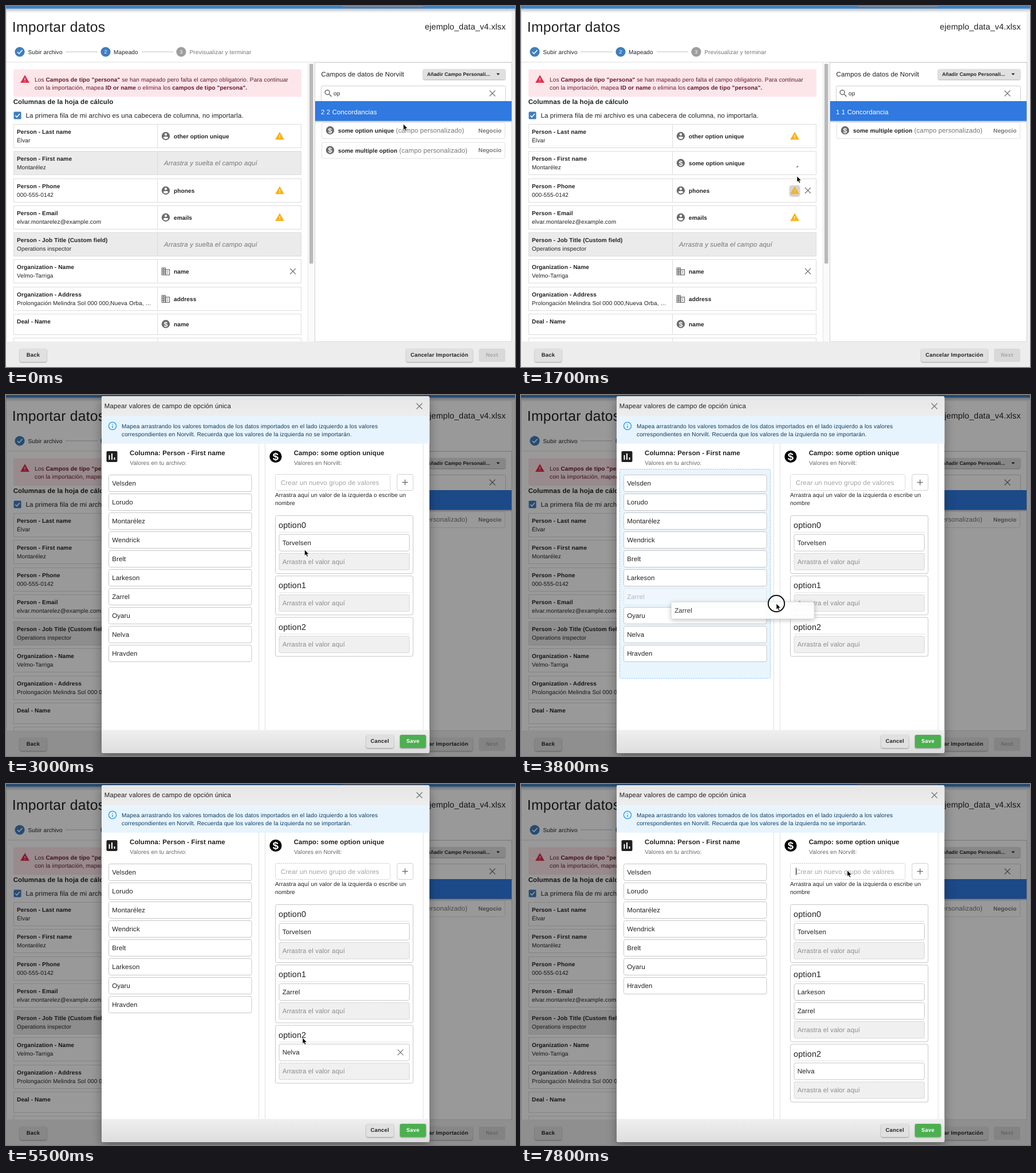
Animation, 889 px wide and 630 px high, one loop 8 s. Source, as an HTML page:

```html
<!DOCTYPE html>
<html lang="es">
<head>
<meta charset="utf-8">
<title>Importar datos</title>
<style>
  html, body { margin: 0; width: 100%; height: 100%; overflow: hidden; background: #fff; }
  svg { display: block; width: 889px; height: 630px; }
  text { font-family: "Liberation Sans", Arial, sans-serif; letter-spacing: .01em; white-space: pre; text-rendering: geometricPrecision; }
  .b { font-weight: 700; }
  .i { font-style: italic; }
  .btn { font-weight: 700; letter-spacing: .0286em; }
  .raised { filter: drop-shadow(0 1px 1.2px rgba(0,0,0,.35)); }
  .ghost { filter: drop-shadow(0 2px 4px rgba(0,0,0,.28)); }
  .dialog { filter: drop-shadow(0 6px 9px rgba(0,0,0,.35)); }
</style>
</head>
<body>
<svg id="stage" viewBox="0 0 889 630" xmlns="http://www.w3.org/2000/svg"></svg>
<script>
const LOOP = 8000, STEP = 100;
const INK = '#212121', GREY = '#757575', BLUE = '#3f7fbf';
const PRODUCT = 'Norvilt';

// ---------- drawing helpers ----------
const text = (x, y, s, size = 10.1, fill = INK, cls = '', extra = '') =>
  `<text x="${x}" y="${y}" font-size="${size}" fill="${fill}" class="${cls}" ${extra}>${s}</text>`;
const bold = (x, y, s, size, fill) => text(x, y, s, size, fill, 'b');
const rect = (x, y, w, h, fill, extra = '') =>
  `<rect x="${x}" y="${y}" width="${w}" height="${h}" fill="${fill}" ${extra}/>`;
const box = (x, y, w, h, stroke, fill = '#fff', r = 0, extra = '') =>
  rect(x + .5, y + .5, w - 1, h - 1, fill, `stroke="${stroke}" rx="${r}" ${extra}`);
const line = (x1, y1, x2, y2, stroke = '#e0e0e0', w = 1) =>
  `<path d="M${x1} ${y1}L${x2} ${y2}" stroke="${stroke}" stroke-width="${w}" fill="none"/>`;
const circle = (x, y, r, fill, extra = '') => `<circle cx="${x}" cy="${y}" r="${r}" fill="${fill}" ${extra}/>`;
const group = (body, extra) => `<g ${extra}>${body}</g>`;
const icon = (x, y, d, fill, scale = .72) =>
  `<path transform="translate(${x} ${y}) scale(${scale}) translate(-12 -12)" d="${d}" fill="${fill}" fill-rule="evenodd"/>`;
const button = (x, y, w, h, label, fill = '#e0e0e0', color = INK, cls = 'raised') =>
  rect(x, y, w, h, fill, `rx="3" class="${cls}"`) +
  text(x + w / 2, y + h / 2 + 2.8, label, 9.38, color, 'btn', 'text-anchor="middle"');
const cross = (x, y, r = 5, color = GREY) =>
  line(x - r, y - r, x + r, y + r, color, 1.3) + line(x - r, y + r, x + r, y - r, color, 1.3);
const tick = (x, y, s = 1) =>
  `<path d="M${x - 4.2 * s} ${y + .2}l${3 * s} ${3 * s} ${5.6 * s} ${-6.2 * s}" fill="none" stroke="#fff" stroke-width="1.6"/>`;

const warning = (x, y, fill = '#f9b115') =>
  icon(x, y, 'M1 21h22L12 2zM13 18h-2v-2h2zM13 14h-2v-4h2z', fill);
const dollar = (x, y, r = 7.2, fill = '#6b6b6b') =>
  circle(x, y, r, fill) +
  text(x, y + r * .63, '$', r * 1.75, '#fff', 'b', 'text-anchor="middle"');
const person = (x, y) =>
  circle(x, y, 7.2, '#6b6b6b') + circle(x, y - 2.9, 2.2, '#fff') +
  `<path d="M${x - 4.3} ${y + 2.9}c0-3 8.6-3 8.6 0q-4.3 4.6-8.6 0z" fill="#fff"/>`;
function building(x, y) {
  let s = rect(x - 6.7, y - 5.9, 6.2, 12.2, 'none', 'stroke="#6b6b6b" stroke-width="1.2"') +
          rect(x, y - 3, 6.6, 9.3, 'none', 'stroke="#6b6b6b" stroke-width="1.2"') +
          line(x - 3.6, y - 6, x - 3.6, y + 6, '#6b6b6b', 1.3);
  for (let k = 0; k < 3; k++) s += line(x - 6.7, y - 3 + k * 3, x, y - 3 + k * 3, '#6b6b6b', 1.3);
  return s + rect(x + 2.6, y - .8, 1.6, 1.6, '#6b6b6b') + rect(x + 2.6, y + 2.3, 1.6, 1.6, '#6b6b6b');
}

// ---------- content ----------
const rows = [
  ['Person - Last name', 'Élvar', person, 'other option unique', true],
  ['Person - First name', 'Montarélez'],
  ['Person - Phone', '000-555-0142', person, 'phones', true],
  ['Person - Email', 'elvar.montarelez@example.com', person, 'emails', true],
  ['Person - Job Title (Custom field)', 'Operations inspector'],
  ['Organization - Name', 'Velmo-Tarriga', building, 'name'],
  ['Organization - Address', 'Prolongación Melindra Sol 000 000,Nueva Orba, …', building, 'address'],
  ['Deal - Name', '', dollar, 'name'],
];
const values = ['Velsden', 'Lorudo', 'Montarélez', 'Torvelsen', 'Wendrick', 'Brelt',
  'Larkeson', 'Zarrel', 'Oyaru', 'Nelva', 'Hravden'];

// ---------- timeline ----------
const fieldDrag = { grab: 200, drop: 1200 };
const drags = [
  { name: 'Torvelsen', option: 0, grab: 2200, drop: 2800 },
  { name: 'Zarrel', option: 1, grab: 3400, drop: 4300 },
  { name: 'Nelva', option: 2, grab: 4700, drop: 5500 },
  { name: 'Larkeson', option: 1, grab: 6000, drop: 6700 },
];
const path = [
  [0, 694, 206], [200, 690, 212], [500, 588, 172], [800, 484, 262], [1200, 481, 270],
  [1700, 482, 297], [1900, 483, 286], [2200, 345, 254], [2700, 545, 259], [2900, 540, 262],
  [3400, 363, 340], [3800, 446, 364], [4200, 540, 370], [4400, 530, 372], [4700, 352, 386],
  [5200, 520, 458], [5500, 518, 443], [6000, 336, 332], [6400, 564, 396], [6500, 571, 398],
  [6700, 570, 396], [7200, 580, 190], [7600, 570, 153], [7800, 570, 151], [LOOP, 570, 151],
];
function pointer(t) {
  const n = Math.max(1, path.findIndex(p => p[0] >= t));
  const [t0, x0, y0] = path[n - 1], [t1, x1, y1] = path[n];
  const u = (t - t0) / (t1 - t0), e = u * u * (3 - 2 * u);
  return { x: x0 + (x1 - x0) * e, y: y0 + (y1 - y0) * e };
}
const held = (d, t) => t >= d.grab && t < d.drop;

// ---------- import page ----------
function resultRow(y, name) {
  return box(551, y, 321, 29, '#e0e0e0', '#fff', 2) + dollar(566, y + 14) +
    `<text x="580" y="${y + 18}" font-size="10.1" fill="${INK}"><tspan class="b">${name}</tspan>` +
    `<tspan font-size="11.5" fill="${GREY}"> (campo personalizado)</tspan></text>` +
    bold(825, y + 17.5, 'Negocio', 10.1, GREY);
}

function mappingRow(row, i, t, p) {
  let [title, sample, symbol, field, warn] = row;
  const y = Math.round(206 + i * 47.25), h = sample ? 42 : 37, mid = y + (sample ? 21 : 18);
  const isTarget = i === 1;
  if (isTarget && t >= fieldDrag.drop) [symbol, field] = [dollar, 'some option unique'];
  const hot = isTarget && held(fieldDrag, t) && p.x < 516;
  const fill = field ? '#fff' : hot ? '#e3f2fd' : '#ebebeb';
  let s = box(13, y, 503, h, hot ? '#90caf9' : '#dcdcdc', fill) + line(264.5, y, 264.5, y + h, '#dcdcdc') +
    bold(19, y + 17.3, title) + text(19, y + 31.5, sample);
  s += field ? symbol(279, mid) + bold(293, mid + 3.7, field)
             : text(276, mid + 4, 'Arrastra y suelta el campo aquí', 11.5, GREY, 'i');
  const hover = i === 2 && t >= 1500;
  if (hover) s += rect(469.5, mid - 9, 17, 18, '#d4d4d4', 'rx="3" class="raised"');
  if (warn) s += warning(478, mid - .3);
  if (hover || i === 5) s += cross(501, mid);
  if (isTarget && t >= 1600) s += line(481.5, mid + 7.5, 484, mid + 5.3, '#555', 1.3);
  return s;
}

function page(t, p) {
  const mapped = t >= fieldDrag.drop;
  let s = rect(0, 0, 889, 630, '#fff') + rect(0, 4, 889, 8, 'url(#barShade)') +
    rect(0, 0, 889, 4.5, BLUE) + rect(588, 0, 140, 1, '#a08a80') +
    rect(883, 10, 6, 620, '#f1f1f1') + line(.5, 5, .5, 630, '#d5d5d5');
  s += text(10.8, 45, 'Importar datos', 24.7) + text(731.5, 41, 'ejemplo_data_v4.xlsx', 14.4);

  s += circle(24, 80, 8.6, BLUE) + tick(24, 80) + text(38.5, 83.7, 'Subir archivo') + line(104, 80, 160, 80, '#bdbdbd');
  s += circle(174, 80, 8.6, BLUE) + text(174, 83.1, '2', 8.66, '#fff', '', 'text-anchor="middle"') +
    text(188, 83.7, 'Mapeado') + line(237, 80, 292, 80, '#bdbdbd');
  s += circle(306, 80, 8.6, '#9e9e9e') + text(306, 83.1, '3', 8.66, '#fff', '', 'text-anchor="middle"') +
    text(320.5, 83.7, 'Previsualizar y terminar', 10.1, GREY);
  s += line(0, 98, 883, 98, '#dcdcdc');

  const wine = '#611a2e';
  s += rect(13, 110.5, 503, 48, '#fde6ea', 'rx="2"') + warning(33, 127.5, '#e0314f') +
    text(50, 131.5, 'Los <tspan class="b">Campos de tipo "persona"</tspan> se han mapeado pero falta el campo obligatorio. Para continuar', 10.1, wine) +
    text(50, 145.6, 'con la importación, mapea <tspan class="b">ID or name</tspan> o elimina los <tspan class="b">campos de tipo "persona".</tspan>', 10.1, wine);
  s += bold(12.7, 171, 'Columnas de la hoja de cálculo', 11.5) +
    rect(13.5, 184.5, 13, 13, BLUE, 'rx="1.5"') + tick(20, 191, .9) +
    text(34.5, 195, 'La primera fila de mi archivo es una cabecera de columna, no importarla.', 11.5);
  rows.forEach((row, i) => s += mappingRow(row, i, t, p));
  s += box(13, 579, 503, 40, '#dcdcdc') + line(264.5, 579, 264.5, 600, '#dcdcdc');

  s += rect(528, 99, 11, 487, '#fafafa') + line(527.5, 99, 527.5, 586, '#e4e4e4') +
    rect(530, 101, 6.5, 348.5, '#b9b9b9', 'rx="1"');
  s += box(539, 98, 345, 488, '#cfcfcf') +
    text(550.5, 122.5, `Campos de datos de ${PRODUCT}`, 11.5) +
    rect(728.5, 110, 143.5, 18, '#e0e0e0', 'rx="2.5" class="raised"') +
    bold(735.5, 122, 'Añadir Campo Personali...', 8.66) +
    `<path d="M856.500 117.500h6l-3 3.200z" fill="${INK}"/>`;
  s += box(550, 139, 323, 28, '#cfcfcf', '#fff', 2) +
    icon(563, 152.500, 'M15.500 14h-.8l-.3-.3A6.500 6.500 0 1 0 13.700 14.400l.3.3v.8l5 5 1.500-1.500zM9.500 14a4.500 4.500 0 1 1 0-9 4.500 4.500 0 0 1 0 9z', '#666') +
    text(572, 156.3, 'op') + cross(849.5, 152.5);
  s += rect(540, 200, 343, 4, 'url(#barShade)') + rect(540, 166, 343, 34.5, '#2f79e0') +
    text(550, 189, mapped ? '1 1 Concordancia' : '2 2 Concordancias', 11.5, '#fff');
  if (mapped) s += resultRow(203, 'some multiple option');
  else s += group(resultRow(203, 'some option unique'), `opacity="${held(fieldDrag, t) ? .3 : 1}"`) +
    resultRow(237.5, 'some multiple option');

  s += rect(0, 585.5, 889, 45, '#ededed') + button(24, 598, 47, 23, 'Back') +
    button(699, 598, 116, 23, 'Cancelar Importación') +
    button(826, 598, 46, 23, 'Next', '#d9d9d9', '#a6a6a6', '');
  if (held(fieldDrag, t)) {
    const g = pointer(fieldDrag.grab);
    s += group(resultRow(203, 'some option unique'),
      `class="ghost" opacity=".9" transform="translate(${p.x - g.x} ${p.y - g.y})"`);
  }
  return s;
}

// ---------- value mapping dialog ----------
const valueCard = (x, y, w, name) =>
  box(x, y, w, 30, '#c6c6c6', '#fff', 3) + text(x + 6.2, y + 18.7, name, 11.5);

function optionCard(index, y, items, active, p, idle) {
  const h = 69 + 33 * items.length;
  let s = box(470, y, 241.5, h, '#c6c6c6', '#fff', 3) + text(476, y + 22, 'option' + index, 14.4) +
    line(477, y + 29.5, 705, y + 29.5);
  items.forEach((name, k) => {
    const top = y + 32.8 + 33 * k;
    s += valueCard(476.5, top, 228.5, name);
    if (idle && p.x > 476 && p.x < 705 && p.y > top - 12 && p.y < top + 20) s += cross(689, top + 15);
  });
  const top = y + 32.8 + 33 * items.length;
  return s + box(476.5, top, 228.5, 30, active ? '#7dbdf0' : '#c0c0c0', active ? '#e3f2fd' : '#f0f0f0', 2, 'stroke-dasharray="2 1.5"') +
    text(482.7, top + 18.7, 'Arrastra el valor aquí', 11.5, active ? '#b4c4d0' : '#8c8c8c');
}

function dialog(t, p) {
  const current = drags.find(d => held(d, t));
  const done = drags.filter(d => t >= d.drop);
  const left = values.filter(v => !done.some(d => d.name === v));
  const overSlot = current && p.x > 470;
  let s = rect(167, 2, 572.5, 623, '#fff', 'rx="3" class="dialog"') +
    `<path d="M167 37V5q0-3 3-3h566.500q3 0 3 3v32z" fill="url(#headShade)"/>` +
    `<path d="M167 584.500h572.500V622q0 3-3 3H170q-3 0-3-3z" fill="url(#footShade)"/>`;
  s += text(171.8, 23, 'Mapear valores de campo de opción única', 11.5) + cross(722, 19.5);
  const navy = '#0d3c61';
  s += rect(167, 37, 572.5, 48, '#e8f4fd') +
    circle(186, 54, 6.6, 'none', 'stroke="#2196f3" stroke-width="1.3"') +
    line(186, 53.5, 186, 57.5, '#2196f3', 1.4) + line(186, 50.4, 186, 51.8, '#2196f3', 1.4) +
    text(202, 57.5, 'Mapea arrastrando los valores tomados de los datos importados en el lado izquierdo a los valores', 10.1, navy) +
    text(202, 71.7, `correspondientes en ${PRODUCT}. Recuerda que los valores de la izquierda no se importarán.`, 10.1, navy);
  s += line(441.5, 85, 441.5, 584.5) + line(452.5, 85, 452.5, 584.5) + line(728.5, 85, 728.5, 584.5);

  s += rect(175.5, 98, 19, 19, INK, 'rx="2"') + line(180.500, 105, 180.500, 113, '#fff', 2) +
    line(185, 102, 185, 113, '#fff', 2) + line(189.500, 109, 189.500, 113, '#fff', 2) +
    bold(216, 104.5, 'Columna: Person - First name', 11.5) + text(216.3, 122, 'Valores en tu archivo:', 10.1, '#666');
  s += dollar(471, 107.5, 10.6, '#000') + bold(502.7, 104.5, 'Campo: some option unique', 11.5) +
    text(503, 122, `Valores en ${PRODUCT}:`, 10.1, '#666');

  if (current && !overSlot)
    s += box(172, 129, 264, 33 * left.length + 36, '#8cc8f2', '#e9f5fd', 2, 'stroke-dasharray="2.5 1.5"');
  left.forEach((name, i) => {
    const lifted = current && current.name === name;
    s += group(valueCard(179, 139 + 33 * i, 250.5, name), lifted ? 'opacity=".28"' : '');
  });

  s += box(470, 138, 201.5, 29, '#c0c0c0', '#fff', 3, 'stroke-dasharray="2 1.5"') +
    text(480, 156.6, 'Crear un nuevo grupo de valores', 11.5, '#a3a3a3') +
    box(682.5, 138, 29, 29, '#d0d0d0', '#fff', 3) +
    line(692, 152.5, 702, 152.5, '#666', 1.3) + line(697, 147.5, 697, 157.5, '#666', 1.3) +
    text(470, 177.7, 'Arrastra aquí un valor de la izquierda o escribe un') + text(470, 191.9, 'nombre');
  if (t >= 7700) s += line(480.5, 146, 480.5, 159, '#222');

  let y = 210;
  for (let k = 0; k < 3; k++) {
    const items = done.filter(d => d.option === k).map(d => d.name).reverse();
    s += optionCard(k, y, items, overSlot && current.option === k, p, !current);
    y += 72.3 + 33 * items.length;
  }
  s += button(629, 593, 48, 23, 'Cancel') + button(688, 593, 45.5, 23, 'Save', '#4caf50', '#fff');

  if (current) {
    const g = pointer(current.grab), top = 139 + 33 * left.indexOf(current.name);
    s += group(valueCard(179 + p.x - g.x, top + p.y - g.y, 250.5, current.name)
      .replace('#c6c6c6', '#e2e2e2'), 'class="ghost" opacity=".9"');
  }
  return s;
}

// ---------- pointer and composition ----------
function cursor(p, pressed) {
  return (pressed ? circle(p.x, p.y, 14.2, 'rgba(255,255,255,.45)', 'stroke="#111" stroke-width="2"') : '') +
    `<path transform="translate(${p.x} ${p.y})" d="M0 0v10.200l2.300-2 1.700 3.900 1.800-.8-1.600-3.700h3.200z" fill="#000" stroke="#fff" stroke-width=".6"/>`;
}
const shade = (id, from, to) =>
  `<linearGradient id="${id}" x2="0" y2="1"><stop stop-color="${from}"/><stop offset="1" stop-color="${to}"/></linearGradient>`;
const defs = `<defs>${shade('barShade', '#b5bcc4', '#fff')}${shade('headShade', '#e6e6e6', '#ededed')}${shade('footShade', '#efefef', '#dedede')}</defs>`;

const stage = document.getElementById('stage');
function draw(t) {
  const p = pointer(t);
  let s = defs + page(t, p);
  if (t >= 1800) {
    const first = t < 1900;
    s += rect(0, 0, 889, 630, '#000', `opacity="${first ? .25 : .4}"`) +
      group(dialog(t, p), `opacity="${first ? .55 : t < 2000 ? .94 : 1}"`);
  }
  stage.innerHTML = s + cursor(p, [fieldDrag, ...drags].some(d => held(d, t)));
}

const start = performance.now();
let shown = -1;
function tickFrame(now) {
  const t = Math.floor(Math.max(0, now - start) % LOOP / STEP) * STEP;
  if (t !== shown) draw(shown = t);
  requestAnimationFrame(tickFrame);
}
draw(0);
requestAnimationFrame(tickFrame);
</script>
</body>
</html>
```
